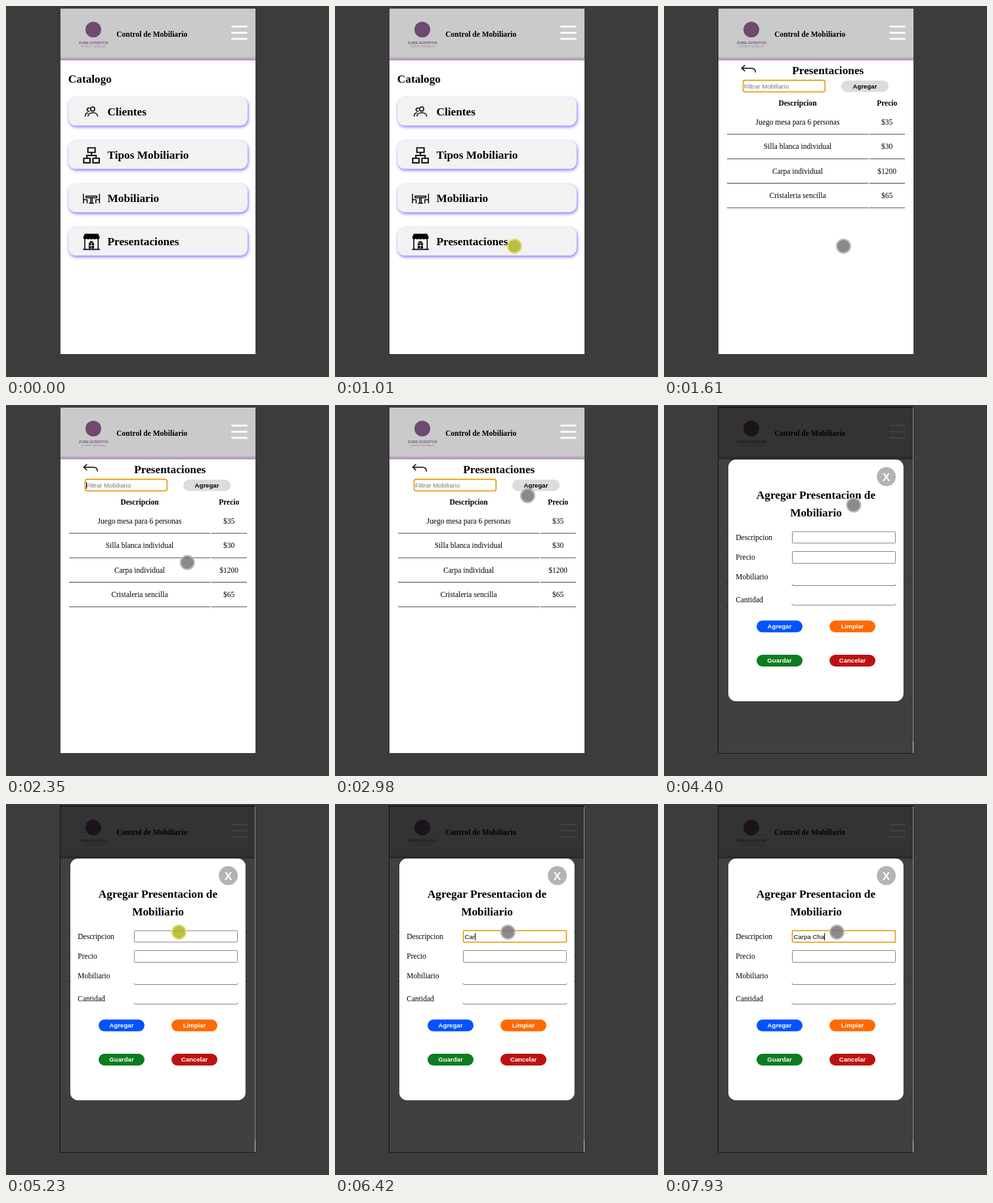
These frames come from a looping animation (492x566 px, 8000 ms). An HTML page:

```html
<!DOCTYPE html>
<html lang="es">
<head>
<meta charset="utf-8">
<title>Control de Mobiliario</title>
<style>
  html, body { margin: 0; height: 100%; overflow: hidden; background: #3c3c3c; }
  svg { display: block; }
  text { font: 11.52px "Liberation Serif", "Times New Roman", serif; white-space: pre; }
  .bold { font-weight: bold; }
  .title { font-weight: bold; font-size: 17.28px; }
  .ui { font: 9.6px "Liberation Sans", Arial, sans-serif; }
  .button { font-weight: bold; }
  .mid { text-anchor: middle; }
  .card { fill: #f2f2f2; filter: drop-shadow(1px 2px 2.5px #7a6cff); }
  .icon { fill: none; stroke: #000; stroke-width: 1.6; }
  .field { fill: #fff; stroke: #858585; }
  .focus { fill: #fff; stroke: #e59700; stroke-width: 1.6; }
  .caret { stroke: #000; }
</style>
</head>
<body>
<svg id="stage" width="492" height="566" viewBox="0 0 492 566"></svg>
<script>
const stage = document.getElementById('stage');

const text = (x, y, str, cls = '', extra = '') =>
  `<text x="${x}" y="${y}" class="${cls}" ${extra}>${str}</text>`;
const box = (x, y, w, h, r, attrs) =>
  `<rect x="${x}" y="${y}" width="${w}" height="${h}" rx="${r}" ${attrs}/>`;
const pill = (x, y, w, h, color, label, ink) =>
  box(x, y, w, h, h / 2, `fill="${color}"`) +
  text(x + w / 2, y + h / 2 + 3.4, label, 'ui button mid', `fill="${ink}"`);
const icon = (d, width = 1.6) => `<path class="icon" style="stroke-width:${width}" d="${d}"/>`;

const header = `
  <rect x="83" y="4" width="297" height="527" fill="#fff"/>
  <rect x="83" y="4" width="297" height="79" fill="url(#bar)"/>
  <circle cx="133" cy="36" r="12" fill="#6f4a70"/>
  ${text(133.3, 58, 'ZUBE EVENTOS', 'ui mid', 'style="font-size:5.8px;font-weight:bold" fill="#7d5688"')}
  ${text(133.3, 63, 'FLORES Y DETALLES', 'ui mid', 'style="font-size:3.7px" fill="#94799c"')}
  ${text(168.3, 47, 'Control de Mobiliario', 'bold')}
  <path d="M344.5 31.3h22M344.5 40.8h22M344.5 50.2h22" stroke="#fff" stroke-width="2.8" stroke-linecap="round"/>`;

const cards = ['Clientes', 'Tipos Mobiliario', 'Mobiliario', 'Presentaciones'].map((name, i) =>
  box(95, 139.5 + 66.1 * i, 273, 43, 11.5, 'class="card"') +
  text(154.5, 167 + 66 * i, name, 'title')).join('');

const icons =
  icon('M128.8 157.3a3.2 3.2 0 1 0 6.4 0a3.2 3.2 0 1 0-6.4 0M125 168.6c0-7.8 14.6-7.8 14.6 0' +
    'M127.4 160a2.4 2.4 0 1 1 .2-3.6M120.6 168.4c0-3.8 1.6-5.4 4.6-5.2', 1.5) +
  icon('M124.7 216.4h11v7h-11zM118.4 232.4h9.6v6.8h-9.6zM132.4 232.4h9.6v6.8h-9.6z' +
    'M130.2 223.4v4.6M123.2 232v-4h14v4', 1.9) +
  icon('M118 286.5v14.5M118 295.6h5.6v5.4M142.4 286.5v14.5M142.4 295.6h-5.6v5.4' +
    'M122 290h16.4v2.4h-16.4zM129 293v7.6M131.4 293v7.6M126.4 300.8h7.6', 1.5) +
  `<path d="M120 347.5h20.4l2.4 5.5a3 3 0 0 1-5.1 2a3.4 3.4 0 0 1-5 0a3.4 3.4 0 0 1-5 0
    a3.4 3.4 0 0 1-5 0a3 3 0 0 1-5.1-2z"/>` +
  icon('M120 356v15M140.4 356v15M117.4 371.4h25.6') +
  '<path d="M126 361.5h8v8.5h-8zM127.5 359h5v2h-5z"/>' +
  '<path d="M130 362v8M126.4 365.6h7.2" stroke="#f2f2f2"/>';

const rows = [['Juego mesa para 6 personas', '$35'], ['Silla blanca individual', '$30'],
  ['Carpa individual', '$1200'], ['Cristaleria sencilla', '$65']].map(([name, price], i) => {
  const y = 181 + 37.4 * i;
  return text(203.5, y, name, 'mid') + text(339.7, y, price, 'mid') +
    `<path d="M96 ${y + 14.7}h215.3M312.6 ${y + 14.7}h54.4" stroke="#707070" stroke-width="1.3"/>`;
}).join('');

const list = `
  ${icon('M123.4 90.3l-5 4.6l5 4.6M118.6 94.9h14.6q6.2 0 6.2 6.6', 1.5)}
  ${text(249.8, 104, 'Presentaciones', 'title mid')}
  ${box(120.5, 113.4, 124.8, 17.6, 3, 'class="focus"')}
  ${text(122, 126, 'Filtrar Mobiliario', 'ui', 'fill="#757575"')}
  <path id="filterCaret" class="caret" d="M122.5 117.5v10.5"/>
  ${pill(270, 113.7, 72, 17.6, '#dcdcdc', 'Agregar', '#000')}
  ${text(203.5, 152, 'Descripcion', 'bold mid')}${text(339.7, 152, 'Precio', 'bold mid')}
  ${rows}`;

const labels = [['Descripcion', 206], ['Precio', 236], ['Mobiliario', 266], ['Cantidad', 301]]
  .map(([name, y]) => text(109.3, y, name)).join('');

const modal = `
  <path d="M82 2.5h297.3v529.2h-297.3z" fill="#000" fill-opacity=".75"/>
  <path d="M379.5 4v509" stroke="#8a8a8a"/>
  ${box(98, 83.3, 266.8, 368.6, 11.5, 'fill="#fff"')}
  <circle cx="338.6" cy="109.2" r="14.4" fill="#b3b3b3"/>
  ${text(338.6, 115.6, 'X', 'ui button mid', 'style="font-size:17.28px" fill="#fff"')}
  ${text(231.5, 143, 'Agregar Presentacion de', 'title mid')}
  ${text(231.5, 170, 'Mobiliario', 'title mid')}
  ${labels}
  <rect id="field" x="195.5" y="193.3" width="157" height="17.4" rx="1"/>
  ${box(195.5, 223.5, 157, 18, 1, 'class="field"')}
  <path d="M195 273.2q0 2.3 2 2.3h154q2 0 2-2.3M195 303q0 2.3 2 2.3h154q2 0 2-2.3" fill="none" stroke="#808080"/>
  ${text(197.6, 206, '', 'ui', 'id="typed"')}
  <path id="caret" class="caret" d="M0 197v11"/>
  ${pill(141, 328.8, 70, 18, '#0053ff', 'Agregar', '#fff')}
  ${pill(252, 328.8, 70, 18, '#ff6a00', 'Limpiar', '#fff')}
  ${pill(141, 381, 70, 18, '#0b7d20', 'Guardar', '#fff')}
  ${pill(252, 381, 70, 18, '#bd1111', 'Cancelar', '#fff')}`;

stage.innerHTML = `
  <linearGradient id="bar" x1="0" y1="0" x2="0" y2="1">
    <stop offset=".92" stop-color="#cacaca"/><stop offset=".98" stop-color="#b598bb"/>
  </linearGradient>
  ${header}
  <g id="menu">${text(94.8, 117, 'Catalogo', 'title')}${cards}${icons}</g>
  <g id="list">${list}</g>
  <g id="modal">${modal}</g>
  <circle id="pointer" r="10.4" stroke-width="2.2"/>`;

const el = id => document.getElementById(id);
const show = (id, on) => el(id).style.display = on ? '' : 'none';

const LOOP = 8000, LIST_AT = 1140, MODAL_AT = 3400, FOCUS_AT = 5290;
const clicks = [[1010, 1210], [3260, 3470], [5230, 5420]];
const phrase = 'Carpa Cha';
const keyTimes = [6090, 6290, 6420, 6680, 6880, 7010, 7530, 7800, 7930];

const linear = p => p;
const easeOut = p => 1 - (1 - p) ** 2;
const easeInOut = p => p * p * (3 - 2 * p);
// Pointer legs: start, end, from, to, easing
const legs = [
  [260, 810, [411, 527], [273.4, 366.4], easeOut],
  [1880, 2700, [273.4, 366.4], [278, 160], easeInOut],
  [2700, 2980, [278, 160], [293.3, 138.5], linear],
  [2980, 3120, [293.3, 138.5], [304.5, 126.5], easeOut],
  [4200, 4680, [304.5, 126.5], [263.4, 195.4], easeInOut],
];

const blink = since => since >= 0 && since % 1000 < 500;

function pointerAt(t) {
  const [start, end, from, to, ease] = legs.filter(leg => leg[0] <= t).pop() || legs[0];
  const p = ease(Math.min(1, Math.max(0, (t - start) / (end - start))));
  return from.map((v, i) => v + (to[i] - v) * p);
}

function draw(t) {
  show('menu', t < LIST_AT);
  show('list', t >= LIST_AT);
  show('modal', t >= MODAL_AT);
  show('filterCaret', t < MODAL_AT && blink(t - 1110));

  const focused = t >= FOCUS_AT;
  const pressed = keyTimes.filter(k => k <= t);
  el('field').setAttribute('class', focused ? 'focus' : 'field');
  el('typed').textContent = phrase.slice(0, pressed.length);
  show('caret', focused && blink(t - (pressed[pressed.length - 1] || FOCUS_AT)));
  if (focused) {
    const x = Math.floor(197.6 + el('typed').getComputedTextLength()) + 0.5;
    el('caret').setAttribute('transform', `translate(${x})`);
  }

  const down = clicks.some(([a, b]) => t >= a && t < b);
  const pointer = el('pointer');
  show('pointer', t >= legs[0][0]);
  pointer.setAttribute('transform', `translate(${pointerAt(t)})`);
  pointer.setAttribute('fill', down ? 'rgba(180,180,37,.85)' : 'rgba(117,117,117,.85)');
  pointer.setAttribute('stroke', down ? '#dede6a' : '#b9b9b9');
}

function tick() {
  draw(performance.now() % LOOP);
  requestAnimationFrame(tick);
}
tick();
</script>
</body>
</html>
```
